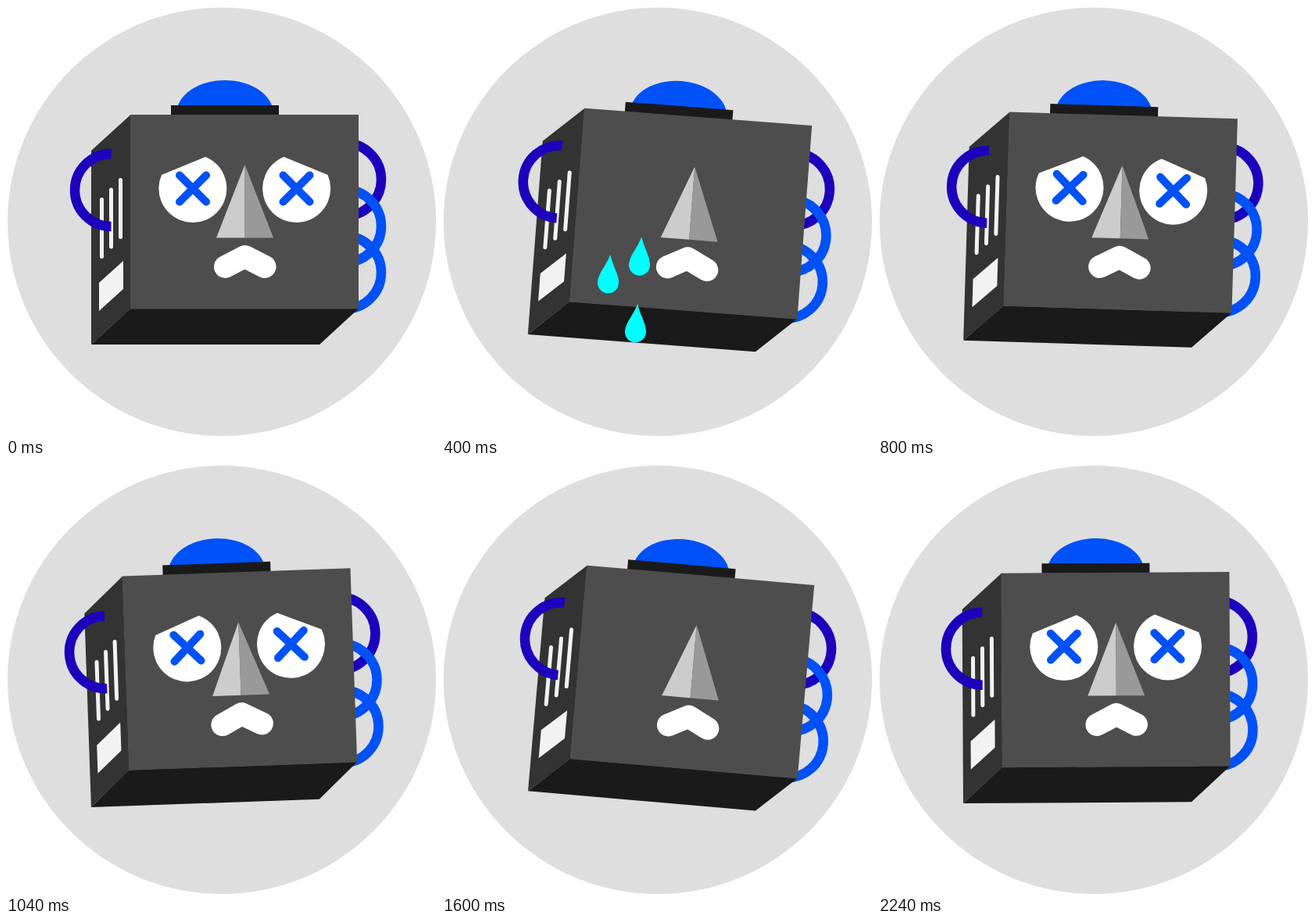
Write an HTML page that moves like this. It is 550 px wide and 550 px high and loops after 2.32 s.

```html
<!DOCTYPE html>
<html lang="en">
<head>
<meta charset="utf-8">
<title>Crying robot</title>
<style>
  html, body { margin: 0; width: 100%; height: 100%; overflow: hidden; background: #fff; }
  svg { display: block; width: 100%; height: 100%; }
</style>
</head>
<body>
<svg viewBox="0 0 550 550">
  <defs>
    <path id="tear" fill="#0ff" d="M0-36C4-22 13.5-11 13.5 0A13.5 13.5 0 0 1-13.5 0C-13.5-11-4-22 0-36Z"/>
    <g id="eye">
      <path fill="#fff" d="M16-40.5A43.5 43.5 0 1 1-40-17.5Z"/>
      <path stroke="#0051f7" stroke-width="10" stroke-linecap="round" d="M-17-17 17 17M17-17-17 17"/>
    </g>
  </defs>
  <circle cx="276" cy="276" r="274" fill="#dedede"/>
  <g id="head">
    <g fill="none" stroke="#0051f7" stroke-width="12.5">
      <circle cx="433.5" cy="222" r="46.5" stroke="#1c00bc"/>
      <circle cx="433.5" cy="281.5" r="46.5"/>
      <circle cx="433.5" cy="341" r="46.5"/>
    </g>
    <ellipse cx="280" cy="138" rx="62" ry="43" fill="#0051f7"/>
    <path fill="#1a1a1a" d="M211 127h138v13h-138ZM109 433l50-46h292l-50 46Z"/>
    <path fill="#333" d="M109 185l50.5-46v248l-50.5 46Z"/>
    <path fill="#4d4d4d" d="M159 139h292v248.500h-292Z"/>
    <path stroke="#f2f2f2" stroke-width="5" stroke-linecap="round" d="M122.500 247.500v73M134.500 235v73M146.500 222.500v73"/>
    <path fill="#f2f2f2" d="M119 354l31-28v36l-31 28Z"/>
    <path fill="none" stroke="#1c00bc" stroke-width="12.500" d="M134.500 189a46.500 46.500 0 0 0 0 93"/>
    <g id="eyes">
      <use href="#eye" transform="translate(239 233.500)"/>
      <use href="#eye" transform="translate(371.500 233.500) scale(-1 1)"/>
    </g>
    <path fill="#ccc" d="M305.500 203V296.500H269Z"/>
    <path fill="#999" d="M305.500 203V296.500H342Z"/>
    <path fill="none" stroke="#fff" stroke-width="29" stroke-linecap="round" stroke-linejoin="round" d="M280.500 333.500 305.500 320.500 331 333.500"/>
    <g id="tears"><use href="#tear"/><use href="#tear"/><use href="#tear"/></g>
  </g>
</svg>
<script>
const LOOP = 2320, STEP = 80;
const head = document.getElementById('head');
const eyes = document.getElementById('eyes');
const drops = [...document.getElementById('tears').children];

// [time, tilt in degrees]; the last swing is cut off by the loop
const tilts = [[0, 0], [525, 5.1], [1110, -2.3], [1580, 5], [2060, -0.6], [2420, 0]];
// [x, start time]
const falls = [[206.4, 226], [244.6, 269], [246, 126]];

function tiltAt(t) {
  const i = tilts.findIndex(k => k[0] > t);
  const [t0, a] = tilts[i - 1], [t1, b] = tilts[i];
  const u = (t - t0) / (t1 - t0);
  return a + (b - a) * u * u * (3 - 2 * u);
}

const show = (el, on) => el.setAttribute('visibility', on ? 'visible' : 'hidden');

function draw(t) {
  head.setAttribute('transform', `rotate(${tiltAt(t)} 280 437)`);
  const beat = t % 1200;
  show(eyes, beat < 240 || beat >= 560);
  falls.forEach(([x, start], i) => {
    const y = 255 + (t - start) * 0.6;
    show(drops[i], y >= 255 && y < 430);
    drops[i].setAttribute('transform', `translate(${x} ${y})`);
  });
}

const begin = performance.now();
function tick() {
  const t = (performance.now() - begin) % LOOP;
  draw(Math.floor(t / STEP) * STEP);
  requestAnimationFrame(tick);
}
tick();
</script>
</body>
</html>
```
